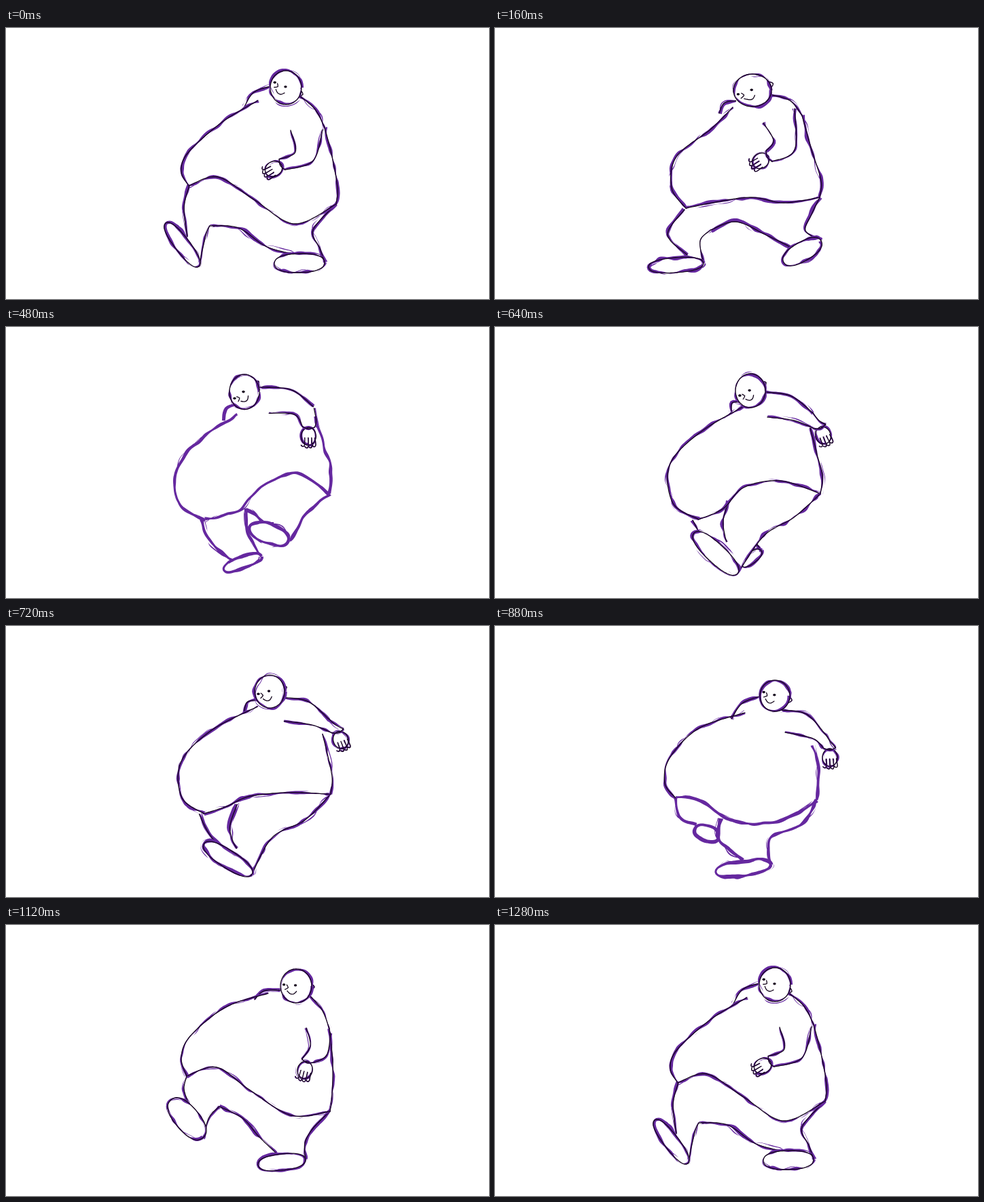
An HTML page that plays this animation: 711x400 px, repeating every 1.32 s.

```html
<!DOCTYPE html>
<html lang="en">
<head>
<meta charset="utf-8">
<title>Walk cycle</title>
<style>
  html, body { margin: 0; width: 100%; height: 100%; overflow: hidden; background: #fff; }
  svg { display: block; width: 100vw; height: 100vh; }
</style>
</head>
<body>
<svg id="stage" viewBox="0 0 711 400"></svg>
<script>
const LOOP = 1320, STEP = 80, COUNT = 16;
const INK = "#14051c", PURPLE = "#65289f";

// head: x, y, rx, ry, tilt in degrees; hand: x, y, direction in degrees
// feet: toe, heel, half thickness; everything else: points along a line
// at: drawing index; weight: brush width; pen: groups that get a dark line
const keys = [
  { at: 0, weight: 4.2, pen: "upper torso lower", rig: {
    head: [412, 88, 23, 25, 22], hand: [394, 208, 152],
    chest: [371, 107, 318, 139, 268, 184, 258, 212, 269, 233],
    hem: [312, 220, 366, 254, 425, 289, 486, 260],
    shoulder: [433, 101, 455, 120, 469, 147], back: [469, 147, 480, 190, 488, 236],
    sleeve: [466, 150, 452, 196], crook: [419, 151, 426, 183],
    thigh: [270, 232, 262, 265, 267, 308], shin: [294, 306],
    inner: [300, 292, 342, 295, 384, 323, 430, 335], calf: [452, 298, 462, 325],
    farFoot: [235, 288, 284, 352, 11], nearFoot: [395, 348, 469, 346, 14] } },
  { at: 2, weight: 4.6, pen: "upper torso lower", rig: {
    head: [379, 92, 28, 24, -18], hand: [391, 196, 151],
    chest: [350, 117, 318, 149, 267, 190, 260, 236, 281, 266],
    hem: [325, 257, 378, 250, 425, 258, 478, 250],
    shoulder: [404, 98, 434, 107, 452, 129], back: [452, 129, 466, 180, 480, 225],
    sleeve: [441, 119, 441, 180], crook: [395, 140, 410, 166],
    thigh: [279, 268, 254, 305, 283, 335], shin: [302, 314],
    inner: [318, 298, 355, 286, 400, 306, 442, 327], calf: [466, 275, 457, 299],
    farFoot: [226, 353, 307, 347, 11], nearFoot: [425, 346, 480, 314, 14] } },
  { at: 4, weight: 4.2, pen: "upper", rig: {
    head: [337, 98, 23, 26, -36], hand: [405, 172, 121],
    chest: [318, 141, 262, 185, 243, 226, 253, 261, 281, 278],
    hem: [340, 270, 382, 244, 430, 220, 474, 248],
    shoulder: [358, 87, 410, 90, 441, 115], back: [446, 120, 464, 168, 476, 222],
    sleeve: [441, 118, 438, 148], crook: [379, 127, 412, 130],
    thigh: [283, 277, 277, 304, 320, 334], shin: [331, 314],
    inner: [356, 285, 392, 273, 425, 282, 452, 277], calf: [474, 252, 480, 260],
    farFoot: [258, 354, 342, 346, 10], nearFoot: [433, 303, 486, 270, 15] } },
  { at: 8, weight: 4.4, pen: "upper torso lower", rig: {
    head: [376, 94, 22, 25, -28], hand: [483, 160, 70],
    chest: [368, 116, 300, 157, 257, 204, 262, 260, 300, 284],
    hem: [336, 268, 366, 237, 420, 227, 479, 246],
    shoulder: [398, 96, 436, 102, 468, 127], back: [464, 149, 474, 188, 482, 220],
    sleeve: [468, 127, 477, 138], crook: [401, 133, 440, 138],
    thigh: [291, 285, 312, 322, 350, 358], shin: [372, 300],
    inner: [344, 257, 336, 285, 338, 306, 341, 317], calf: [440, 281, 396, 308],
    farFoot: [363, 352, 392, 330, 8], nearFoot: [293, 304, 357, 364, 14] } },
  { at: 11, weight: 4.4, pen: "upper torso", rig: {
    head: [412, 103, 22, 23, 15], hand: [493, 194, 88],
    chest: [368, 128, 300, 151, 257, 195, 250, 232, 266, 254],
    hem: [300, 256, 345, 284, 412, 290, 474, 257],
    shoulder: [418, 124, 458, 130, 488, 162], back: [468, 176, 475, 210, 475, 240],
    sleeve: [488, 162, 493, 170], crook: [427, 157, 468, 166],
    thigh: [266, 254, 272, 280, 296, 294], shin: [328, 302],
    inner: [331, 284, 329, 312, 344, 331, 365, 346], calf: [450, 293, 405, 313],
    farFoot: [293, 300, 328, 312, 11], nearFoot: [325, 363, 407, 352, 11] } },
  { at: 14, weight: 3.8, pen: "upper torso lower", rig: {
    head: [427, 90, 23, 25, 3], hand: [440, 214, 107],
    chest: [386, 101, 324, 121, 272, 163, 258, 195, 266, 223],
    hem: [310, 210, 358, 243, 420, 281, 477, 275],
    shoulder: [446, 103, 465, 125, 476, 153], back: [476, 153, 481, 205, 480, 250],
    sleeve: [478, 160, 472, 192], crook: [442, 152, 448, 178],
    thigh: [266, 223, 262, 242, 269, 264], shin: [299, 284],
    inner: [314, 268, 348, 285, 372, 312, 398, 337], calf: [452, 300, 440, 322],
    farFoot: [243, 258, 290, 314, 18], nearFoot: [371, 354, 441, 346, 12] } }
];

const mod = (a, n) => ((a % n) + n) % n;
const hash = (a, b) => mod(Math.sin(a * 127.1 + b * 311.7) * 43758.5453, 1);

function noise(seed, x) {
  const i = Math.floor(x), f = x - i, s = f * f * (3 - 2 * f);
  return hash(seed, i) * (1 - s) + hash(seed, i + 1) * s;
}

// Cyclic Hermite blend of one rig entry over the key poses
function blend(name, d) {
  const n = keys.length;
  let i = n - 1;
  while (keys[i].at > d) i--;
  const time = j => keys[mod(j, n)].at + Math.floor(j / n) * COUNT;
  const span = time(i + 1) - time(i), u = (d - time(i)) / span;
  const u2 = u * u, u3 = u2 * u;
  return keys[i].rig[name].map((_, k) => {
    const v = j => keys[mod(j, n)].rig[name][k];
    const slope = j => (v(j + 1) - v(j - 1)) / (time(j + 1) - time(j - 1)) * span;
    return (2 * u3 - 3 * u2 + 1) * v(i) + (u3 - 2 * u2 + u) * slope(i)
      + (3 * u2 - 2 * u3) * v(i + 1) + (u3 - u2) * slope(i + 1);
  });
}

function nearestKey(d) {
  const gap = k => Math.min(Math.abs(k.at - d), COUNT - Math.abs(k.at - d));
  return keys.reduce((a, b) => gap(b) < gap(a) ? b : a);
}

const pairs = flat => flat.filter((_, i) => i % 2 === 0).map((x, i) => [x, flat[2 * i + 1]]);

// Local coordinates turned by an angle in degrees around (x, y)
function frame(x, y, deg) {
  const c = Math.cos(deg * Math.PI / 180), s = Math.sin(deg * Math.PI / 180);
  return (a, b) => [x + a * c - b * s, y + a * s + b * c];
}

function oval(place, rx, ry, power = 1) {
  const bend = v => Math.sign(v) * Math.abs(v) ** power;
  return Array.from({ length: 16 }, (_, i) => {
    const a = i / 16 * Math.PI * 2;
    return place(rx * bend(Math.cos(a)), ry * bend(Math.sin(a)));
  });
}

function foot([x1, y1, x2, y2, h]) {
  const deg = Math.atan2(y2 - y1, x2 - x1) * 180 / Math.PI;
  return oval(frame((x1 + x2) / 2, (y1 + y2) / 2, deg), Math.hypot(x2 - x1, y2 - y1) / 2, h, 0.85);
}

// Smooth curve through the points, sampled about every 3 px
function curve(pts, closed) {
  const n = pts.length, out = [], last = closed ? n : n - 1;
  const at = i => pts[closed ? mod(i, n) : Math.max(0, Math.min(n - 1, i))];
  for (let i = 0; i < last; i++) {
    const a = at(i - 1), b = at(i), c = at(i + 1), e = at(i + 2);
    const steps = Math.max(2, Math.ceil(Math.hypot(c[0] - b[0], c[1] - b[1]) / 3));
    for (let s = 0; s < steps; s++) {
      const u = s / steps;
      out.push([0, 1].map(k => b[k] + 0.5 * u * (c[k] - a[k]
        + u * (2 * a[k] - 5 * b[k] + 4 * c[k] - e[k]
        + u * (3 * (b[k] - c[k]) + e[k] - a[k])))));
    }
  }
  return out.concat([at(last)]);
}

const line = pts => "M" + pts.map(p => p[0].toFixed(1) + " " + p[1].toFixed(1)).join("L");

// Uneven brush mark along a curve
function ribbon(pts, width, shift) {
  const left = [], right = [];
  pts.forEach((p, i) => {
    const a = pts[Math.max(0, i - 1)], b = pts[Math.min(pts.length - 1, i + 1)];
    const dx = b[0] - a[0], dy = b[1] - a[1], len = Math.hypot(dx, dy) || 1;
    const w = width(i) / 2, o = shift(i);
    const side = r => [p[0] - dy / len * r, p[1] + dx / len * r];
    left.push(side(o + w));
    right.unshift(side(o - w));
  });
  return line(left.concat(right)) + "Z";
}

function draw(d) {
  const key = nearestKey(d), rig = {};
  for (const name in key.rig) rig[name] = blend(name, d);
  const pt = {};
  for (const name in rig) pt[name] = pairs(rig[name]);

  let svg = "", seed = d + 1;
  const path = (data, style) => svg += `<path d="${data}" ${style}/>`;
  const cover = pts => path(line(pts), 'fill="#fff"');

  function stroke(group, pts, { closed = false, brush = 1 } = {}) {
    const c = curve(pts, closed), inked = key.pen.includes(group);
    const w = key.weight * brush, s = seed += 17;
    if (closed) cover(c);
    if (w) {
      const low = inked ? 0.05 : 0.6, vary = inked ? 1.3 : 0.7;
      const main = ribbon(c, i => w * (low + vary * noise(s, i / 4)),
        i => (noise(s + 0.3, i / 6) - 0.5) * w * 0.8);
      const loose = ribbon(c, i => Math.max(0, noise(s + 0.6, i / 5) - 0.35) * w * 0.6,
        i => (noise(s + 0.8, i / 7) - 0.5) * w * 1.8);
      path(main + loose, `fill="${PURPLE}"`);
    }
    if (inked) path(line(c), `fill="none" stroke="${INK}" stroke-width="1.3" stroke-linecap="round"`);
  }

  // Legs
  const heel = f => [rig[f][2], rig[f][3]];
  const belly = pt.chest[4], hip = pt.hem[3];
  const calf = [hip, ...pt.calf, heel("nearFoot")];
  stroke("lower", pt.thigh, { brush: 1.1 });
  stroke("lower", [pt.inner[0], ...pt.shin, heel("farFoot")]);
  stroke("lower", foot(rig.farFoot), { closed: true, brush: 1.1 });
  cover([...curve(pt.inner), ...curve(calf).reverse()]);
  stroke("lower", pt.inner, { brush: 1.25 });
  stroke("lower", calf, { brush: 1.1 });
  stroke("lower", foot(rig.nearFoot), { closed: true, brush: 1.1 });

  // Body
  const [hx, hy, rx, ry, tilt] = rig.head;
  const face = frame(hx, hy, tilt);
  const neck = face(-rx, ry * 0.3), [cx, cy] = pt.chest[0];
  const tip = [cx - 20, cy + 9];
  stroke("torso", [neck, [(neck[0] + tip[0]) / 2 - 5, (neck[1] + tip[1]) / 2 - 6], tip]);
  stroke("torso", pt.chest);
  stroke("lower", [belly, ...pt.hem]);
  stroke("lower", [...pt.back, hip]);
  stroke("upper", pt.shoulder);

  // Arm and hand
  const palm = frame(...rig.hand);
  stroke("upper", [...pt.sleeve, palm(-14, -9)], { brush: 0.9 });
  stroke("upper", [...pt.crook, palm(-14, 9)], { brush: 0.9 });
  stroke("upper", oval(palm, 13, 11), { closed: true, brush: 0.8 });
  for (let i = 0; i < 4; i++) {
    const f = i - 1.5, reach = 18 - Math.abs(f) * 2;
    stroke("upper", [palm(2, f * 5 - 2), palm(reach - 2, f * 5.5 - 2.5),
      palm(reach, f * 5.5), palm(reach - 2, f * 5.5 + 2.5)], { brush: 0.4 });
  }
  stroke("upper", [palm(-14, -9), palm(-11, 0), palm(-14, 9)], { brush: 0.6 });

  // Head
  stroke("upper", [face(rx - 2, -5), face(rx + 4, 0), face(rx - 2, 6)], { brush: 0.3 });
  stroke("upper", oval((a, b) => [hx + a, hy + b], rx, ry), { closed: true });
  stroke("upper", [face(-rx * 0.6, -1), face(-rx * 0.5, 3), face(-rx * 0.7, 6)], { brush: 0 });
  stroke("upper", [face(-rx * 0.55, 8), face(-8, 12), face(-3, 12), face(1, 8)], { brush: 0 });
  for (const [x, y] of [face(-rx * 0.78, -1), face(-1, -1)])
    svg += `<ellipse cx="${x}" cy="${y}" rx="2.2" ry="1.8" fill="${INK}"/>`;

  document.getElementById("stage").innerHTML = svg;
}

let shown = -1;
const start = performance.now();
function tick() {
  const t = (performance.now() - start) % LOOP;
  const d = Math.floor(t / STEP) % COUNT;
  if (d !== shown) draw(shown = d);
  requestAnimationFrame(tick);
}
tick();
</script>
</body>
</html>
```
